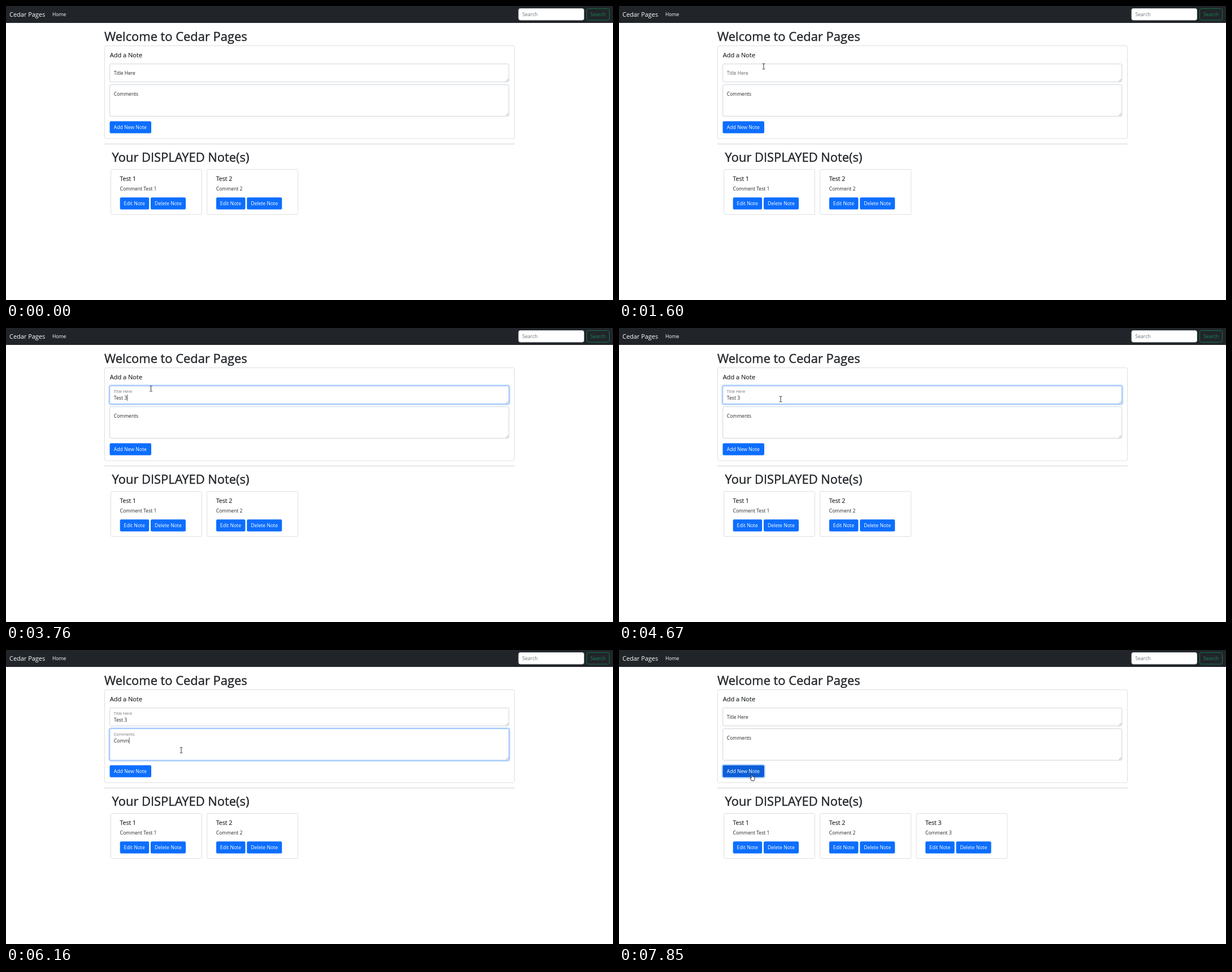
An HTML page that plays this animation: 1074x521 px, repeating every 8000 ms.

```html
<!DOCTYPE html>
<html lang="en">
<head>
<meta charset="utf-8">
<title>Notes</title>
<style>
  html, body { margin: 0; width: 100%; height: 100%; overflow: hidden; background: #fff; }
  svg { display: block; width: 1074px; height: 521px; }
  text { font: 400 8.65px "Open Sans", "Noto Sans", sans-serif; fill: #212529; white-space: pre; }
  .h1 { font-size: 21.9px; stroke: #212529; stroke-width: .4px; }
  .h5 { font-size: 11px; stroke: #212529; stroke-width: .18px; }
  .brand { font-size: 10.95px; fill: #fff; }
  .light { fill: #fff; }
  .label { font-size: 8.5px; }
  .label.dim { opacity: .72; }
  .label.up { font-size: 7.25px; opacity: .65; }
  .card { fill: #fff; stroke: #dfdfdf; }
  .input { fill: #fff; stroke: #ced4da; }
  .btn { fill: #0d6efd; }
  .btn.hover { fill: #0b5ed7; }
  .ring { fill: none; stroke: #c2dbfe; stroke-width: 2.3px; }
  .focus .input { stroke: #86b7fe; }
  .field .ring, .field .caret { visibility: hidden; }
  .focus .ring, .caret.on { visibility: visible !important; }
  .grip { fill: none; stroke: #777; stroke-width: .6px; }
  .caret { fill: #333; }
</style>
</head>
<body>
<svg viewBox="0 0 1074 521">
  <rect width="1074" height="30" fill="#212529"/>
  <text class="brand" x="6" y="18.8">Cedar Pages</text>
  <text class="light" x="82" y="18">Home</text>
  <rect class="input" x="907" y="4.5" width="115.5" height="20.5" rx="3"/>
  <text x="913.5" y="18" style="fill:#6c757d">Search</text>
  <rect x="1027.5" y="4.5" width="40" height="20.5" rx="3" fill="none" stroke="#17704a"/>
  <text x="1034" y="18" style="fill:#198754">Search</text>

  <text class="h1" x="174" y="61.5">Welcome to Cedar Pages</text>
  <rect class="card" x="174.5" y="70.5" width="725" height="164.5" rx="2.2"/>
  <text class="h5" x="183.8" y="91">Add a Note</text>
  <g id="fields"></g>
  <rect id="addRing" class="ring" x="182.4" y="203.1" width="75.7" height="23.5" rx="3.2"/>
  <rect id="add" class="btn" x="183.5" y="204.2" width="73.5" height="21.3" rx="2.2"/>
  <text class="light" x="190.8" y="218.2">Add New Note</text>
  <rect x="174" y="244" width="726" height="1" fill="#cfd0d1"/>

  <text class="h1" x="187.6" y="276">Your DISPLAYED Note(s)</text>
  <g id="cards"></g>

  <g id="beam" fill="none">
    <path d="M-2.3-4.8H-.7L0-4.3 .7-4.8H2.3M0-4.3V4.3M-2.3 4.8H-.7L0 4.3 .7 4.8H2.3" stroke="#333" stroke-width="1"/>
  </g>
  <path id="hand" fill="#fff" stroke="#111" stroke-width=".9" stroke-linejoin="round"
    d="M-1.9 1.2V-5Q-1.9-6-1-6T-.1-5V-1.7Q.9-2.3 1.4-1.3 2.2-1.8 2.7-.8 3.8-1.2 3.9 .1V2.6Q3.8 4.2 2.8 5.8H-1.4Q-2.2 4-4 1.7-4.3.7-3.2.5Z"/>
</svg>
<script>
const $ = id => document.getElementById(id);
const LOOP = 8000, SUBMIT = 7850;

const fieldMarkup = (id, label, top, height) => `
  <g id="${id}" class="field">
    <rect class="ring" x="182.4" y="${top - 1.2}" width="708.7" height="${height + 2.4}" rx="3.2"/>
    <rect class="input" x="183.7" y="${top}" width="706.1" height="${height}" rx="2.2"/>
    <path class="grip" d="M884.5 ${top + height - .8}l4.6-4.6M887 ${top + height - .8}l2.1-2.1"/>
    <text class="label" x="190.8">${label}</text>
    <text class="value" x="190.8" y="${top + 24.3}"></text>
    <rect class="caret" y="${top + 15.4}" width=".8" height="11"/>
  </g>`;

const button = (x, width, label) => `
  <rect class="btn" x="${x}" y="339.2" width="${width}" height="21.3" rx="2.2"/>
  <text class="light" x="${x + 6.9}" y="353.3">${label}</text>`;

const cardMarkup = (title, comment, i) => `
  <g id="card${i}" transform="translate(${i * 170.25} 0)">
    <rect class="card" x="185.5" y="289.5" width="161" height="80" rx="2.2"/>
    <text class="h5" style="font-size:10.6px" x="201.5" y="310">${title}</text>
    <text x="201.5" y="327" style="font-size:8.55px">${comment}</text>
    ${button(201.7, 51.5, "Edit Note")}${button(256, 62, "Delete Note")}
  </g>`;

$("fields").innerHTML =
  fieldMarkup("title", "Title Here", 102.7, 31.8) + fieldMarkup("comment", "Comments", 139.5, 55.8);
$("cards").innerHTML = [["Test 1", "Comment Test 1"], ["Test 2", "Comment 2"], ["Test 3", "Comment 3"]]
  .map(([title, comment], i) => cardMarkup(title, comment, i)).join("");

const fields = [
  { id: "title", top: 102.7, text: "Test 3",
    keys: [2590, 2940, 3110, 3290, 3460, 3760],
    focus: [[130, 300], [1770, 4830]], caret: [[1770, 2270], [2590, 4250]], dim: [300, 1770] },
  { id: "comment", top: 139.5, text: "Comment 3",
    keys: [5480, 5870, 6020, 6160, 6340, 6480, 6620, 6760, 6910],
    focus: [[4830, SUBMIT]], caret: [[4830, 5320], [5480, 7360]], dim: [0, 0] }
].map(f => {
  const part = name => $(f.id).querySelector("." + name);
  return { ...f, root: $(f.id), label: part("label"), value: part("value"), bar: part("caret") };
});

// Pointer stops: time, x, y
const stops = [
  [950, 274, 143], [1120, 268, 131], [1270, 262, 119], [1430, 258, 110], [1600, 256, 107],
  [2270, 256.5, 107.5], [4250, 260, 101], [4400, 270, 109], [4550, 286, 126], [4690, 301, 146],
  [4830, 308.5, 157.5], [4990, 309.5, 167], [5140, 310, 177.5],
  [7210, 293, 192], [7360, 248, 218], [7510, 236, 226]
];
const HOVER = 7360;

const within = (t, [from, to]) => t >= from && t < to;
const any = (t, spans) => spans.some(span => within(t, span));
const show = (el, on) => el.style.visibility = on ? "visible" : "hidden";

function drawField(f, t) {
  const typed = t < SUBMIT ? f.text.slice(0, f.keys.filter(k => t >= k).length) : "";
  const focused = any(t, f.focus), up = focused || typed !== "";
  f.root.classList.toggle("focus", focused);
  f.label.classList.toggle("up", up);
  f.label.classList.toggle("dim", within(t, f.dim));
  f.label.setAttribute("y", f.top + (up ? 12.7 : 19.4));
  if (f.value.textContent !== typed) f.value.textContent = typed;
  f.bar.setAttribute("x", 191 + (typed ? f.value.getComputedTextLength() : 0));
  f.bar.classList.toggle("on", any(t, f.caret));
}

function draw(t) {
  fields.forEach(f => drawField(f, t));

  const stop = stops.filter(s => t >= s[0]).pop();
  const hover = t >= HOVER;
  show($("beam"), stop && !hover);
  show($("hand"), hover);
  if (stop) $(hover ? "hand" : "beam").setAttribute("transform", `translate(${stop[1]} ${stop[2]})`);

  $("add").classList.toggle("hover", hover);
  show($("addRing"), t >= SUBMIT);
  show($("card2"), t >= SUBMIT);
}

const start = performance.now();
function tick() {
  draw((performance.now() - start) % LOOP);
  requestAnimationFrame(tick);
}
tick();
</script>
</body>
</html>
```
